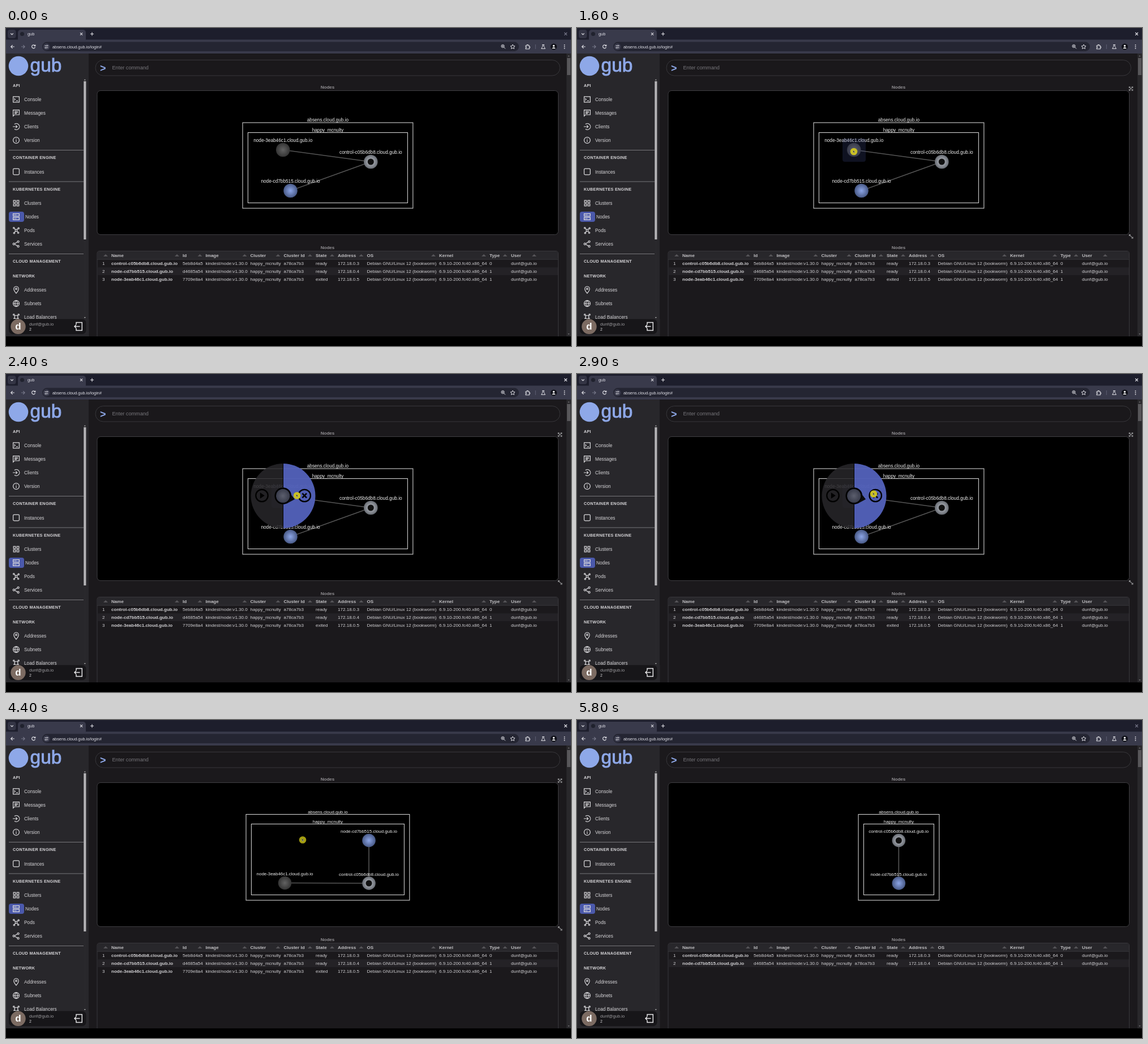
Write an HTML page that moves like this. It is 998 px wide and 561 px high and loops after 6.8 s.

```html
<!DOCTYPE html>
<html lang="en">
<head>
<meta charset="utf-8">
<title>Nodes</title>
<style>
html, body { margin: 0; width: 100%; height: 100%; overflow: hidden; background: #000; }
svg { display: block; width: 998px; height: 561px; font-family: "Liberation Sans", Arial, sans-serif; }
text { white-space: pre; }
</style>
</head>
<body>
<svg id="stage" viewBox="0 0 998 561" fill="none">
  <defs>
    <radialGradient id="grey"><stop stop-color="#626262"/><stop offset="1" stop-color="#343434"/></radialGradient>
    <radialGradient id="blue"><stop stop-color="#8ca5e6"/><stop offset="1" stop-color="#495a87"/></radialGradient>
    <radialGradient id="light"><stop stop-color="#c2c6ce"/><stop offset="1" stop-color="#696d74"/></radialGradient>
  </defs>
  <g id="page"></g>
  <g id="scene"></g>
  <g id="menu"></g>
  <g id="tools" stroke="#8a8a8c" stroke-width="1.2">
    <path d="M975.8 104.3l5.4 5.4m0-5.4l-5.4 5.4M975.3 106v-2.2h2.2m2 0h2.2v2.2m0 2v2.2h-2.2m-2 0h-2.2v-2.2"/>
    <path d="M976 365l5.4 5.4M975.5 367v-2.5h2.5m1.4 6.4h2.5v-2.5"/>
  </g>
  <path id="close" d="M986.2 8l4.8 4.8m0-4.8l-4.8 4.8" stroke-width="1.2"/>
  <g id="cursor">
    <circle id="halo" r="6.3"/>
    <path d="M-1.2-2.2v4l1-.8.8 1.6.8-.4-.8-1.5h1.3z" fill="#111" stroke="#ddd" stroke-width=".4"/>
  </g>
</svg>
<script>
const $ = id => document.getElementById(id);
const LOOP = 6800, HOST = '.cloud.gub.io';

const text = (x, y, s, fill = '#d6d5d8', size = 8.3, more = '') =>
  `<text x="${x}" y="${y + size * .36}" fill="${fill}" font-size="${size}" ${more}>${s}</text>`;
const bold = 'font-weight="700"', mid = 'text-anchor="middle"';
const rect = (x, y, x2, y2, fill, r = 0, more = '') =>
  `<rect x="${x}" y="${y}" width="${x2 - x}" height="${y2 - y}" rx="${r}" fill="${fill}" ${more}/>`;
const circle = (x, y, r, fill, more = '') => `<circle cx="${x}" cy="${y}" r="${r}" fill="${fill}" ${more}/>`;
const line = (d, color = '#dcdce2', w = 1.2, more = '') =>
  `<path d="${d}" stroke="${color}" stroke-width="${w}" ${more}/>`;
const icon = (x, y, d, s = .6) =>
  `<g transform="translate(${x - 12 * s} ${y - 12 * s}) scale(${s})">${line(d, '#dcdbde', 2)}</g>`;
const ring = (x, y, r) => `M${x - r} ${y}a${r} ${r} 0 1 0 ${2 * r} 0a${r} ${r} 0 1 0 ${-2 * r} 0`;
const box = (x, y, w, h = w) => `M${x} ${y}h${w}v${h}h${-w}z`;

function browser() {
  return rect(0, 0, 998, 45, '#1d1e2c') + rect(0, 20.5, 998, 45, '#393a4b') +
    rect(21, 3, 141, 26, '#393a4b', 5) + rect(3, 3, 17.5, 18, '#343545', 4) +
    line('M8.2 9.5l2.3 2.2 2.3-2.2') + circle(28.5, 10.5, 3.6, '#20222e') +
    text(38, 10.5, 'gub', '#e2e2ea', 7.4) +
    line('M131 8.4l4.2 4.2m0-4.2l-4.2 4.2', '#dcdce2', 1.1) + line('M149 10.5h6m-3-3v6') +
    line('M14.8 33h-6m2.8-2.9L8.7 33l2.9 2.9') +
    line('M27 33h6m-2.8-2.9l2.9 2.9-2.9 2.9', '#77788a') +
    line('M51.2 31.2a3 3 0 1 0 .3 2.6M51.8 29.4v2.3h-2.4') +
    rect(64, 24.5, 906, 41, '#242532', 8.2) + circle(71.5, 33, 6, '#393a4b') +
    line('M68.5 31.3h2.7m2.8 0h.7M68.3 34.8h.8m2.6 0h2.8', '#dcdce2', 1) +
    line(ring(72.6, 31.3, 1) + ring(70.4, 34.8, 1), '#dcdce2', .9) +
    text(82, 33, 'absens' + HOST + '/login#', '#e2e2ea', 7.35) +
    line(ring(877.5, 32, 2.6) + 'M879.5 34l2.5 2.5M876.2 32h2.6m-1.3-1.3v2.6', '#dcdce2', 1) +
    line('M895 29l1.2 2.6 2.8.3-2.1 1.9.6 2.8-2.5-1.4-2.5 1.4.6-2.8-2.1-1.9 2.8-.3z', '#dcdce2', 1) +
    line('M918 31h2.2v-1.5h2V31h2v2h1.2v2h-1.2v2H918v-2h1v-2h-1z', '#dcdce2', 1.1) +
    line('M935.3 29v8', '#606173', 1) +
    line('M947 29.5h4m-3 0v2.7l-2.4 4.3h6.8l-2.4-4.3v-2.7', '#dcdce2', 1) +
    circle(967.5, 33, 5.6, '#11121a') + circle(967.5, 31.4, 1.7, '#fff') +
    '<path d="M964.2 36.2q3.3-4.2 6.6 0z" fill="#fff"/>' +
    [30, 33, 36].map(y => circle(986.5, y, .9, '#dcdce2')).join('');
}

function sidebar() {
  const items = [
    [126, 'Console', box(3, 4, 18, 16) + 'M6 9l3 3-3 3M12 16h5'],
    [150, 'Messages', 'M3 3h18v14H7l-4 4zM7 7h10M7 10h10M7 13h7'],
    [174, 'Clients', 'M7 5a9 9 0 1 1 0 14M2 12h13m-4-4l4 4-4 4'],
    [198, 'Version', ring(12, 12, 9) + 'M12 11v6M12 7v2'],
    [253.5, 'Instances', 'M6 3h12q3 0 3 3v12q0 3-3 3H6q-3 0-3-3V6q0-3 3-3z'],
    [309, 'Clusters', box(4, 4, 6) + box(14, 4, 6) + box(4, 14, 6) + box(14, 14, 6)],
    [333, 'Nodes', box(3, 3, 18, 7) + box(3, 14, 18, 7) + 'M6 6.5h2m2 0h2M6 17.5h2m2 0h2'],
    [357, 'Pods', ring(12, 12, 3) + ring(5, 5, 2) + ring(19, 6, 2) + ring(6, 20, 2) + ring(18, 19, 2) + 'M7 7l3 3M14 10l3-3M10 14l-3 4M14 14l3 3'],
    [381, 'Services', ring(5, 12, 2.6) + ring(18, 5, 2.6) + ring(18, 19, 2.6) + 'M7.5 11l8-5M7.5 13l8 5'],
    [462, 'Addresses', 'M12 22q-7-8-7-13a7 7 0 0 1 14 0q0 5-7 13z' + ring(12, 9, 2.2)],
    [486, 'Subnets', ring(12, 12, 9) + 'M3 12h18M12 3q-8 9 0 18q8-9 0-18'],
    [510, 'Load Balancers', ring(12, 12, 5) + ring(5, 5, 2) + ring(19, 5, 2) + 'M7 7l2 2m6 0l2-2M5 20v-4h3m11 4v-4h-3']
  ];
  const heads = [[101, 'API'], [228.5, 'CONTAINER ENGINE'], [284, 'KUBERNETES ENGINE'], [411, 'CLOUD MANAGEMENT'], [437, 'NETWORK']];
  return rect(0, 45, 146.5, 544, '#28272b') + circle(22, 67, 17.3, '#8ea8e8') +
    text(42.5, 64.5, 'gub', '#8ea8e8', 33.5, 'stroke="#8ea8e8" stroke-width=".9"') +
    heads.map(([y, s]) => text(12, y, s, '#d6d5d8', 7.28, bold + ' letter-spacing=".26"')).join('') +
    [215.5, 271, 398.5].map(y => line(`M5 ${y}h132`, '#77767a', 1)).join('') +
    rect(5, 324, 32, 342, '#4b59ab', 4) +
    items.map(([y, s, d]) => icon(18, y, d) + text(s == 'Nodes' ? 34 : 32, y + .2, s)).join('') +
    rect(137, 88, 142, 513, '#29282c') + rect(137.3, 94, 141.4, 373, '#b4b3b6') +
    '<path d="M137.7 92.3h3.2l-1.6-2zM137.7 510h3.2l-1.6 2z" fill="#aaa"/>' +
    rect(0, 513.5, 146.5, 544, '#28272b') + rect(5, 513.5, 141.5, 540, '#171619', 7) +
    circle(21.5, 526.8, 13.2, '#7c6b62') + text(21.5, 526, 'd', '#fff', 17, mid + ' ' + bold) +
    text(41, 521.8, 'dunf@gub.io', '#9c9b9e', 7.6) + text(41, 531.8, '2', '#d6d5d8', 7) +
    line('M124 523v-3.5h10.3v14H124V530M130.5 526.5h-9.5m3-3l-3 3 3 3', '#e4e4e6', 1.5);
}

const columns = [['', 170, 176], ['Name', 186, 302], ['Id', 312, 342.5], ['Image', 352.5, 421.5], ['Cluster', 431.5, 480.5],
  ['Cluster Id', 490.5, 537], ['State', 547, 576], ['Address', 586, 627.5], ['OS', 637.5, 755], ['Kernel', 765, 844],
  ['Type', 854, 881.5], ['User', 892, 933]];
const nodes = [['control-c05b6db8', '5eb8d4a5', 'ready', 3, 0], ['node-cd7bb515', 'd4685a54', 'ready', 4, 1],
  ['node-3eab46c1', '7709e8a4', 'exited', 5, 1]];

function row([name, id, state, ip, type], i) {
  const cells = [i + 1, name + HOST, id, 'kindest/node:v1.30.0', 'happy_mcnulty', 'a78ca7b3', state, '172.18.0.' + ip,
    'Debian GNU/Linux 12 (bookworm)', '6.9.10-200.fc40.x86_64', type, 'dunf@gub.io'];
  return cells.map((s, c) => text(columns[c][1], 415.3 + 13.8 * i, s, '#d0cfd2', 8.05, c == 1 ? bold : '')).join('');
}

function content() {
  return rect(146.5, 45, 998, 544, '#1b191c') +
    rect(158, 56.5, 978.5, 84, '#1a181b', 13.7, 'stroke="#38373b"') +
    text(166, 70.5, '&gt;', '#8ea8e8', 18, bold) + text(187.5, 70, 'Enter command', '#77767b', 9.13) +
    [104, 387.5].map(y => text(568, y, 'Nodes', '#918f93', 8.1, mid + ' ' + bold)).join('') +
    rect(161, 110.5, 975.5, 364.5, '#000', 6, 'stroke="#3f3e42"') +
    '<path d="M161 544V398q0-4.5 4.5-4.5H971q4.5 0 4.5 4.5V544" stroke="#39383c"/>' +
    rect(161.5, 394, 975, 408, '#28272b', 3) + line('M161 408.2h814', '#39383c', 1) +
    rect(161.5, 422.2, 975, 436, '#242226') +
    columns.map(([s, x, a]) => text(x, 401, s, '#c0bfc2', 8.05, bold) +
      `<path d="M${a - 4} 403h8l-4-4z" fill="#565559"/>`).join('') +
    rect(990, 45, 998, 544, '#29282b') + rect(991, 53, 997, 83, '#58575a') +
    '<path d="M992.4 50.2h3.2l-1.6-2zM992.4 539h3.2l-1.6 2z" fill="#77767a"/>';
}

// Node places per layout: control, running worker, stopped worker
const layouts = [
  { zoom: 8.25, left: 418, top: 167, pad: 17.5, spots: [[644.3, 236], [502.5, 287], [489.2, 215]] },
  { zoom: 7.92, left: 424, top: 166.5, pad: 17, spots: [[641, 288], [641, 212.5], [492.5, 287.5]] },
  { zoom: 7.92, left: 497, top: 166.5, pad: 17, spots: [[568.3, 212.5], [568.3, 288]] }
];

function graph({ zoom, left, top, pad, spots }) {
  const label = (x, y, s) => text(x, y, s, '#f0f0f0', zoom, mid);
  const frame = (l, t, b) => rect(l, t, 1136.8 - l, b, 'none', 0, 'stroke="#cfcfcf" stroke-width="1.1"');
  const [hub, ...rest] = spots, r = zoom * 1.49;
  return frame(left, top, 318) + frame(left + 9.4, top + pad, 308.5) +
    rest.map(p => line(`M${hub}L${p}`, '#555', 1.6)).join('') +
    spots.map(([x, y], i) => circle(x, y, r, `url(#${['light', 'blue', 'grey'][i]})`)).join('') +
    circle(...hub, 5.5, '#111') +
    label(568.4, 162, 'absens' + HOST) + label(568.4, top + 13, 'happy_mcnulty') +
    spots.map(([x, y], i) => label(x, y - zoom * 2.03, nodes[i][0] + HOST)).join('');
}

function radial(active) {
  const half = (sweep, fill) => `<path d="M489.5 158a57 57 0 0 ${sweep} 0 114v-42.5a14.5 14.5 0 0 ${1 - sweep} 0-29z" fill="${fill}"/>`;
  return half(0, 'rgba(39,38,41,.88)') + half(1, active ? 'rgba(82,97,184,.97)' : 'rgba(39,38,41,.88)') +
    line('M489.5 158v42.5m0 29V272', '#000', 1) + circle(489.2, 215, 13.5, 'none', 'stroke="#000" stroke-width="2.5"') +
    (active ? '<path d="M495 229l15-8-7-9q0 10-8 17z" fill="#0b0b0d"/>' : '') +
    line(ring(452, 214.5, 10.7) + ring(527.2, 214.5, 10.7), '#000', 2.3) +
    '<path d="M448.8 209.3v10.4l8-5.2z" fill="#000"/>' + line('M523.4 210.7l7.6 7.6m0-7.6l-7.6 7.6', '#000', 2.5);
}

const path = [[100, 12, 436], [600, 508, 226], [800, 507, 226], [1400, 489, 218], [2200, 489, 218],
  [2300, 499, 216], [2400, 514, 214.5], [2900, 524, 211.5], [LOOP, 524, 211.5]];

function pointer(t) {
  const i = Math.max(1, path.findIndex(k => k[0] > t));
  const [a, b] = [path[i - 1], path[i]];
  const p = Math.max(0, (t - a[0]) / (b[0] - a[0])), e = 1 - (1 - p) ** 2;
  return [1, 2].map(k => a[k] + (b[k] - a[k]) * e);
}

function draw(t) {
  const within = (a, b) => t >= a && t < b;
  const show = (id, on) => $(id).setAttribute('visibility', on ? 'visible' : 'hidden');
  const pressed = within(1600, 3000), gone = t >= 5500;
  $('scene').innerHTML = graph(layouts[gone ? 2 : t >= 4400 ? 1 : 0]) +
    (pressed ? rect(469, 195, 510, 236, 'rgba(70,82,150,.22)', 4) : '') +
    nodes.slice(0, gone ? 2 : 3).map(row).join('');
  $('menu').innerHTML = within(1700, 3000) ? radial(t >= 2400) : '';
  show('tools', within(200, 4600));
  const focus = within(100, 5500);
  show('cursor', focus);
  $('close').setAttribute('stroke', focus ? '#e4e4ea' : '#77788a');
  $('cursor').setAttribute('transform', `translate(${pointer(t)})`);
  $('halo').setAttribute('fill', pressed ? '#c9c022' : '#a39d10');
}

$('page').innerHTML = content() + sidebar() + browser();
const start = performance.now();
let last = -1;
function tick() {
  const t = Math.floor((performance.now() - start) % LOOP / 100) * 100;
  if (t !== last) draw(last = t);
  requestAnimationFrame(tick);
}
tick();
</script>
</body>
</html>
```
